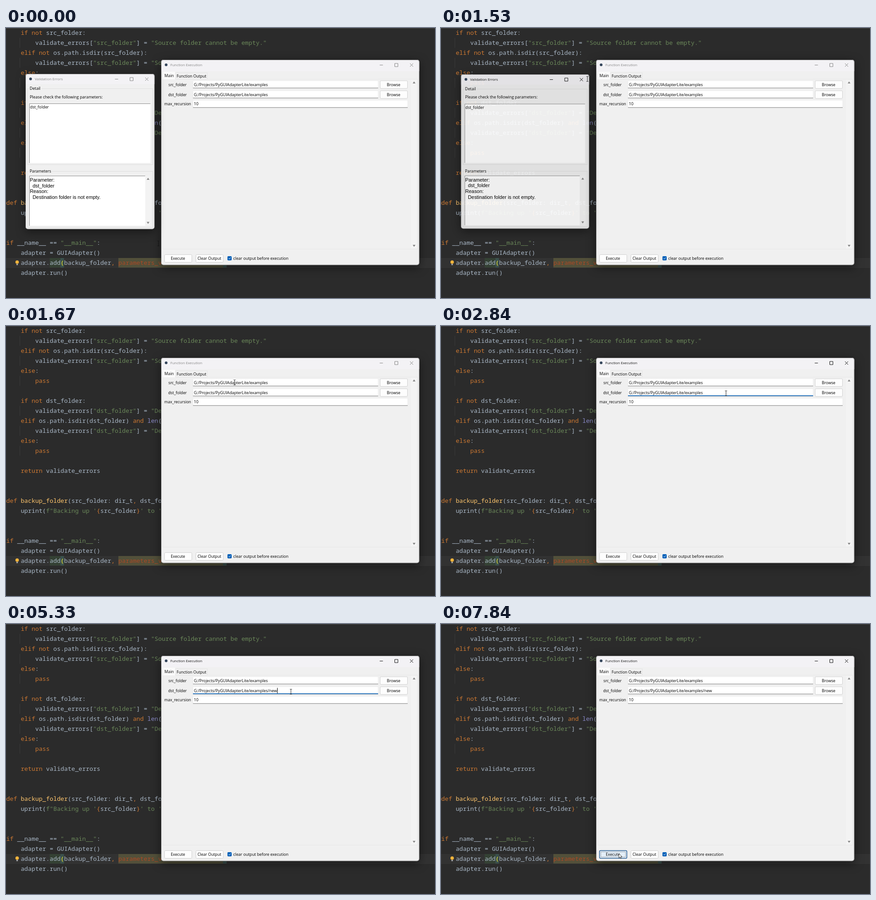
Animation, 943 px wide and 594 px high, one loop 8 s. Source, as an HTML page:

```html
<!DOCTYPE html>
<html lang="en">
<head>
<meta charset="utf-8">
<title>Folder backup form</title>
<style>
  html, body { margin: 0; width: 100%; height: 100%; overflow: hidden; background: #2b2b2b; }
  svg { display: block; }
  text { white-space: pre; font-family: "Open Sans", "Noto Sans", sans-serif; }
  .code { font-family: "Noto Sans Mono", "DejaVu Sans Mono", monospace; font-size: 13.25px; }
  .plain { font-family: "Liberation Sans", Arial, sans-serif; }
  .cjk { font-family: "Noto Sans CJK SC", "Noto Sans CJK", sans-serif; }
  .window { filter: drop-shadow(0 5px 10px rgba(0, 0, 0, .5)); }
  .popup { filter: drop-shadow(0 2px 3px rgba(0, 0, 0, .18)); }
</style>
</head>
<body>
<svg id="stage" width="943" height="594" viewBox="0 0 943 594"></svg>
<script>
const LOOP = 8000;
const BLUE = '#005fb8';
const PATH = 'G:/Projects/PyGUIAdapterLite/examples';

// Drawing helpers
const escapeText = s => s.replace(/&/g, '&amp;').replace(/</g, '&lt;');
const rect = (x, y, w, h, fill, extra = '') =>
  `<rect x="${x}" y="${y}" width="${w}" height="${h}" fill="${fill}" ${extra}/>`;
const line = (d, stroke, extra = '') => `<path d="${d}" fill="none" stroke="${stroke}" ${extra}/>`;
const label = (x, y, s, size = 8.78, extra = '') =>
  `<text x="${x}" y="${y + size * .36}" font-size="${size}" ${extra}>${escapeText(s)}</text>`;
const centred = (x, y, s) => label(x, y, s, 8.7, 'text-anchor="middle"');
const triangle = (x, y, dir) =>
  `<path d="M${x - 3} ${y + 2 * dir}h6l-3 ${-4.6 * dir}z" fill="#858585"/>`;
const box = (x, y, w, h, fill, stroke, r = 0) =>
  rect(x + .5, y + .5, w - 1, h - 1, fill, `stroke="${stroke}" rx="${r}"`);

// Editor
const LINES = {
  0: '    if not src_folder:',
  1: '        validate_errors["src_folder"] = "Source folder cannot be empty."',
  2: '    elif not os.path.isdir(src_folder):',
  3: '        validate_errors["src_folder"] = "Source folder"',
  4: '    else:',
  5: '        pass',
  7: '    if not dst_folder:',
  8: '        validate_errors["dst_folder"] = "Destination"',
  9: '    elif os.path.isdir(dst_folder) and len(os',
  10: '        validate_errors["dst_folder"] = "Destination"',
  11: '    else:',
  12: '        pass',
  14: '    return validate_errors',
  17: 'def backup_folder(src_folder: dir_t, dst_folder',
  18: '    uprint(f"Backing up \'{src_folder}\' to \'{dst',
  21: 'if __name__ == "__main__":',
  22: '    adapter = GUIAdapter()',
  23: '    adapter.add(backup_folder, parameters_validator',
  24: '    adapter.run()'
};
const TOKENS = [
  ['#6a8759', /f?"[^"{]*"?|'[^"{]*"?/],
  ['#cc7832', /\b(?:if|not|elif|else|pass|and|return|def)\b|[,{}]/],
  ['#ffc66d', /(?<=def )\w+/],
  ['#8888c6', /\blen\b/],
  ['#aa4926', /parameters_\w+/],
  ['#ffef28', /(?<=\.add)\(/]
];
const LEXER = new RegExp(TOKENS.map(([, re]) => `(${re.source})`).join('|'), 'g');
const rowY = row => 10.6 + row * 21.98;

function codeLine(row, source) {
  const runs = escapeText(source).replace(LEXER, (token, ...groups) => {
    const kind = groups.slice(0, TOKENS.length).findIndex(g => g !== undefined);
    return `<tspan fill='${TOKENS[kind][0]}'>${token}</tspan>`;
  });
  const guide = source.startsWith('        ')
    ? line(`M30.5 ${rowY(row) - 11}v22`, '#393939') : '';
  return guide + `<text class="code" x="0.6" y="${rowY(row) + 4.8}" fill="#a9b7c6">${runs}</text>`;
}

function editor() {
  return rect(0, 0, 943, 594, '#2b2b2b') + rect(0, 0, 943, 1, '#454545') +
    rect(0, 506, 943, 22, '#323232') +
    rect(96, 506, 23.5, 21, '#344134') + rect(119.5, 506, 8, 21, '#3b514d') +
    rect(247, 506, 230, 21, '#52503a') + rect(477, 506, 8, 21, '#3b514d') +
    Object.entries(LINES).map(([row, s]) => codeLine(+row, s)).join('') +
    '<circle cx="24.5" cy="515" r="3.8" fill="#f2b43c"/>' +
    rect(22.8, 519.2, 3.4, 2.4, '#b9b9b9');
}

// Windows
function windowFrame(x, y, w, h, barHeight) {
  const outline = 'stroke="#444" stroke-opacity=".5" stroke-width=".8" rx="5"';
  return '<g class="window">' + rect(x, y, w, h, '#f0f0f0', 'rx="5"') + '</g>' +
    `<path d="M${x} ${y + barHeight}v${5 - barHeight}q0 -5 5 -5h${w - 10}q5 0 5 5v${barHeight - 5}z" fill="#f3f2f5"/>` +
    rect(x + .4, y + .4, w - .8, h - .8, 'none', outline);
}
function titleBar(id, x, y, title, right) {
  return `<circle cx="${x}" cy="${y}" r="3" fill="#35465c"/>` +
    `<g id="${id}"><g fill="currentColor">${label(x + 9.3, y, title, 7.95)}</g>` +
    line(`M${right - 70} ${y + .5}h7M${right - 37} ${y - 3}h7v7h-7z` +
         `M${right - 3.5} ${y - 3}l7 7m0 -7l-7 7`, 'currentColor') + '</g>';
}
const button = (x, y, s, id = '') =>
  `<g>${rect(x + .5, y + .5, 60, 17, '#fdfdfd', `id="${id}" stroke="#d0d0d0" rx="2"`)}${centred(x + 30, y + 9, s)}</g>`;
const entry = (y, w) => rect(411, y, w, 16.5, '#fff', 'stroke="#e6e6e6" stroke-width=".6" rx="1.5"') +
  rect(411, y + 15.4, w, 1.1, '#868686');
const sunken = (x, y, w, h) => rect(x, y, w, h, '#fff') +
  line(`M${x + .5} ${y + h}V${y + .5}H${x + w}`, '#8c8c8c');

function mainWindow() {
  return windowFrame(341, 70, 567.5, 451.5, 25) +
    titleBar('mainTitle', 352, 81, 'Function Execution', 891.5) +
    box(344, 112, 561, 375, '#f0f0f0', '#e8e8e8') +
    box(372, 98, 71, 15, '#f1f1f1', '#e4e4e4') + rect(345, 96, 27, 17, '#fafafa') +
    rect(890, 114, 14, 371, '#f3f3f3') +
    label(348.3, 104.5, 'Main', 8.9) + label(375, 105.5, 'Function Output', 8.55) +
    label(357, 124.5, 'src_folder') + label(356.5, 146.5, 'dst_folder') +
    label(348, 167, 'max_recursion', 8.6) +
    entry(116, 407) + entry(138, 407) + entry(159, 472) +
    `<rect id="focusLine" x="411" y="152.6" width="407" height="1.5" fill="${BLUE}"/>` +
    label(413, 124.5, PATH) + label(413, 146.5, PATH, 8.78, 'id="dst"') + label(413, 167, '10') +
    line('', '#333', 'id="composing" stroke-dasharray="1 1"') +
    rect(0, 140.5, 1, 12, '#000', 'id="caret"') +
    button(822, 115.5, 'Browse') + button(822, 137.5, 'Browse') +
    triangle(897, 120, 1) + triangle(897, 479, -1) +
    button(348, 498, 'Execute', 'execute') + button(417, 498, 'Clear Output') +
    line('M351.5 501.5h54v11h-54z', '#333', 'id="focusRing" stroke-width=".7" stroke-dasharray="1 1"') +
    rect(486.8, 502, 9.2, 9.2, BLUE, 'rx="1.8"') +
    line('M489 506.6l1.8 1.8 3.2 -3.5', '#fff') +
    label(499.5, 507, 'clear output before execution', 8.82);
}

function dialog() {
  const report = ['Parameter:', '  dst_folder', 'Reason:', '  Destination folder is not empty.'];
  return '<g id="dialog">' + windowFrame(43, 101, 283.5, 341.5, 22.5) +
    '<path id="closeHot" d="M293.5 123V101H321.5q5 0 5 5V123z" fill="#bd4a26"/>' +
    titleBar('dialogTitle', 54, 112, 'Validation Errors', 309.5) +
    box(47, 133, 276, 168, 'none', '#dfdfdf') + rect(50, 130, 28, 6, '#f0f0f0') +
    box(47, 315, 276, 124, 'none', '#dfdfdf') + rect(50, 312, 51, 6, '#f0f0f0') +
    label(52, 133, 'Detail') + label(52, 315, 'Parameters') +
    label(52.3, 151.5, 'Please check the following parameters:', 8.85) +
    sunken(51, 166, 266.5, 131) + label(52.8, 174, 'dst_folder', 8.9) +
    sunken(51, 325, 255, 110) + rect(306, 325, 12, 110, '#f3f3f3') +
    triangle(312.3, 332, 1) + triangle(312.3, 428.5, -1) +
    report.map((s, i) => label(52.4, 334 + i * 12.75, s, 10.95, 'class="plain"')).join('') + '</g>';
}

function candidateBar() {
  return '<g id="ime"><g class="popup">' + rect(582, 154, 366, 24.5, '#fafafa', 'rx="3"') + '</g>' +
    rect(587, 157.5, 41, 19, '#f0f0f0', 'rx="2"') + rect(584, 161, 2.4, 11.5, BLUE, 'rx="1"') +
    '<g id="candidates"></g>' + rect(928, 155, 1, 23, '#e3e3e3') +
    '<path d="M939 164v6l-4 -3z" fill="#777"/></g>';
}

const pointer = '<circle id="halo" r="9" fill="#e2971f" opacity=".78"/>' +
  '<path id="arrow" d="M0 0V9.8L2.3 7.7L3.9 11.2L5.4 10.5L3.9 7.1H7Z" fill="#fff" stroke="#111" stroke-width=".8"/>' +
  '<path id="beam" d="M-2.2 -5.5h1.7l.5 .5l.5 -.5h1.7M0 -5V5M-2.2 5.5h1.7l.5 -.5l.5 .5h1.7" fill="none" stroke="#111" stroke-width=".9"/>';

document.getElementById('stage').innerHTML =
  editor() + mainWindow() + dialog() + candidateBar() + pointer;

const $ = id => document.getElementById(id);
const show = (id, on) => $(id).setAttribute('visibility', on ? 'visible' : 'hidden');
const clamp = v => Math.max(0, Math.min(1, v));
const during = (t, a, b) => t >= a && t < b;
const lastBefore = (t, list) => list.filter(item => item[0] <= t).pop();

// Timeline
const MOVES = [
  [0, 335, 474], [270, 335, 474], [600, 455, 330], [1040, 300, 149], [1110, 308, 122],
  [1250, 319.5, 111], [1530, 320.5, 112], [1670, 502, 124], [1900, 600, 142], [2230, 626.5, 148],
  [5330, 626.5, 148], [5600, 570, 390], [5890, 493, 575], [6490, 493, 575], [6700, 486, 548],
  [7240, 416, 511], [7300, 408, 509], [7440, 391, 505], [LOOP, 391, 505]
];
const TYPED = [
  [0, ''], [3250, '/'], [3650, '/n'], [3780, '/ne'], [3920, "/ne'w"], [4330, '/new']
];
const CANDIDATES = [
  [0, '你 能 那 年 呢 内 女'], [3780, '呢 讷 哪 呐 那 疒 眲'], [3920, '呢哇 了(le)我 呢 讷 那 呐 哪']
];
const CLICKS = [[1250, 1460, 319, 111], [2200, 2300, 626.5, 148], [7700, 7800, 391, 507]];
const CARET_RESETS = [[2240], [3250], [4040]];

function pointerAt(t) {
  const i = MOVES.findIndex(m => m[0] > t);
  const [t0, x0, y0] = MOVES[i - 1], [t1, x1, y1] = MOVES[i];
  const k = (t - t0) / (t1 - t0);
  return [x0 + (x1 - x0) * k, y0 + (y1 - y0) * k];
}

function usesBeam(x, y, t) {
  const inside = (l, top, r, b) => x > l && x < r && y > top && y < b;
  if (during(t, 3650, 4330)) return false;
  if (inside(341, 70, 908, 521)) return inside(411, 116, 818, 154) || inside(411, 159, 883, 176);
  if (t < 1500 && inside(43, 101, 327, 442)) return inside(51, 166, 317, 297) || inside(51, 325, 306, 435);
  return true;
}

function drawPointer(t) {
  const [x, y] = pointerAt(t);
  const beam = usesBeam(x, y, t);
  show('beam', beam);
  show('arrow', !beam);
  $(beam ? 'beam' : 'arrow').setAttribute('transform', `translate(${x} ${y})`);
  const click = CLICKS.find(c => during(t, c[0], c[1]));
  show('halo', click);
  if (click) $('halo').setAttribute('transform', `translate(${click[2]} ${click[3]})`);
  return [x, y];
}

function drawDialog(t, x, y) {
  const k = clamp((t - 1500) / 150);
  const scale = 1 - .03 * k;
  $('dialog').setAttribute('opacity', 1 - k ** 1.6);
  $('dialog').setAttribute('transform',
    `translate(184.7 271.7) scale(${scale}) translate(-184.7 -271.7)`);
  show('dialog', k < 1);
  show('closeHot', t < 1460 && x > 294 && y < 123);
  $('dialogTitle').setAttribute('color', t < 1180 ? '#858585' : '#111');
}

function drawField(t) {
  const focused = during(t, 2240, 7740);
  const composing = during(t, 3650, 4330);
  const dst = $('dst');
  dst.textContent = PATH + lastBefore(t, TYPED)[1];
  const end = 413 + dst.getComputedTextLength();
  const reset = lastBefore(t, CARET_RESETS);
  show('focusLine', focused);
  show('caret', focused && !composing && (t - reset[0]) % 900 < 600);
  $('caret').setAttribute('x', Math.round(end));
  show('composing', composing);
  show('ime', composing);
  if (!composing) return;
  const start = 413 + dst.getSubStringLength(0, PATH.length + 1);
  $('composing').setAttribute('d', `M${start} 152H${end}`);
  let x = 593;
  $('candidates').innerHTML = lastBefore(t, CANDIDATES)[1].split(' ').map((word, i) => {
    const item = label(x, 167, `${i + 1} ${word}`, 10.3, 'class="cjk" fill="#222"');
    x += word.length > 2 ? 61 : 46.8;
    return item;
  }).join('');
}

function drawExecute(t, x) {
  const hover = t > 7200 && x < 408.5;
  const focused = t >= 7700;
  const pressed = during(t, 7700, 7800);
  const face = $('execute');
  face.setAttribute('fill', pressed ? '#cce4f7' : hover ? '#e3eef8' : '#fdfdfd');
  face.setAttribute('stroke', focused ? '#285d92' : hover ? '#0078d4' : '#d0d0d0');
  face.setAttribute('stroke-width', focused ? 1.5 : 1);
  show('focusRing', focused);
}

function render(t) {
  const [x, y] = drawPointer(t);
  drawDialog(t, x, y);
  drawField(t);
  drawExecute(t, x);
  $('mainTitle').setAttribute('color', t < 2240 ? '#858585' : '#111');
}

const began = performance.now();
function tick() {
  render((performance.now() - began) % LOOP);
  requestAnimationFrame(tick);
}
tick();
</script>
</body>
</html>
```
